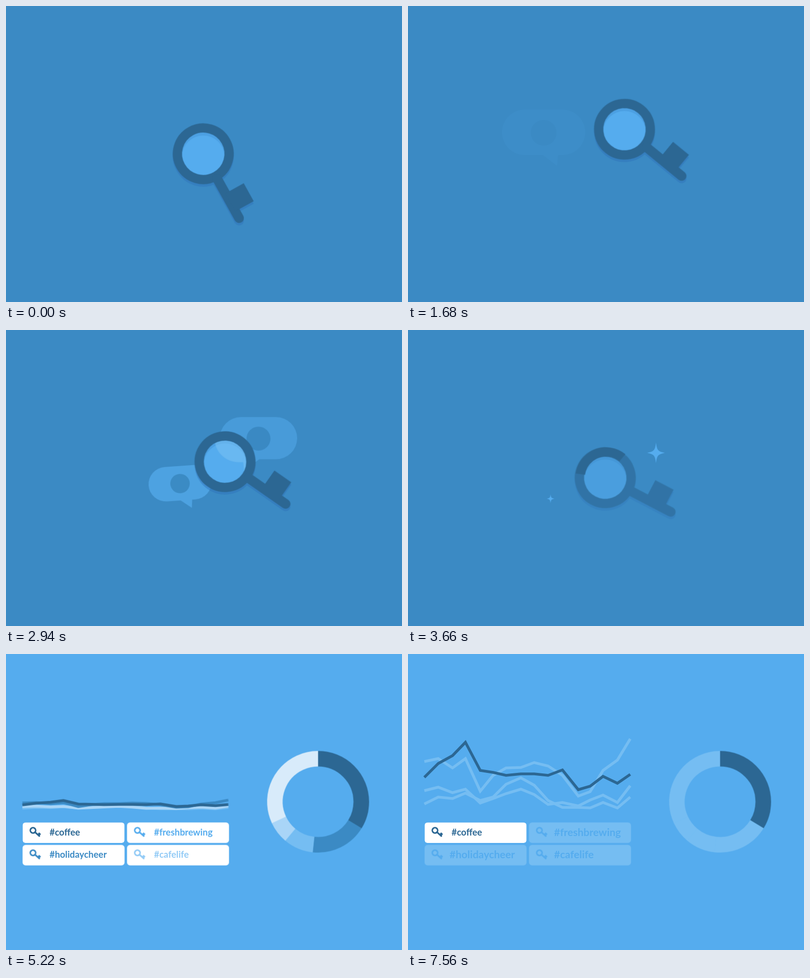
Recreate the animation shown at these times as an HTML page without scripts. Size 800 px wide and 600 px high, loop 8000 ms.

```html
<!DOCTYPE html>
<html lang="en">
<head>
<meta charset="utf-8">
<title>Keyword report</title>
<style>
  @property --x { syntax: "<length>"; inherits: true; initial-value: 398.5px; }
  @property --y { syntax: "<length>"; inherits: true; initial-value: 299.5px; }
  @property --a { syntax: "<angle>"; inherits: true; initial-value: 61deg; }

  html, body { margin: 0; height: 100%; overflow: hidden; background: #3b8ac4; }
  svg { display: block; width: 100vw; height: 100vh; animation: travel 8s infinite; }

  /* Percentages are milliseconds / 80. */
  @keyframes travel {
    0%, 1.875% { --x: 398.5px; --y: 299.5px; --a: 61deg; animation-timing-function: ease-in-out; }
    11.625% { --x: 307px; --y: 261.5px; --a: 56deg; animation-timing-function: ease-in; }
    13.875% { --x: 316px; --y: 264.5px; --a: 46.6deg; animation-timing-function: cubic-bezier(.35, .2, .65, .85); }
    21.75% { --x: 444px; --y: 249px; --a: 39deg; animation-timing-function: ease-out; }
    31.125%, 32.25% { --x: 487px; --y: 234px; --a: 36.5deg; animation-timing-function: ease-in-out; }
    41.25% { --x: 398.5px; --y: 299.5px; --a: 33.5deg; animation-timing-function: ease-out; }
    45.75%, 100% { --x: 398.5px; --y: 299.5px; --a: 27.6deg; }
  }

  .bg { fill: #3b8ac4; animation: brighten 8s linear infinite; }
  @keyframes brighten {
    0%, 46.25% { fill: #3b8ac4; }
    51.875%, 100% { fill: #55acee; }
  }

  /* Key and lens */
  .key { transform: translate(var(--x), var(--y)); animation: key-out 8s linear infinite; }
  .turn { transform: rotate(var(--a)); }
  .still { transform: translate(calc(-1 * var(--x)), calc(-1 * var(--y))); }
  @keyframes key-out {
    0%, 43.5% { opacity: 1; }
    49.5%, 100% { opacity: 0; }
  }

  /* Speech bubbles, growing from the tip of the tail */
  .bubbles { fill: #55acee; color: #3b8ac4; }
  .lit { fill: #7cc3f3; color: #64a9da; }
  .bubble {
    animation: grow 8s infinite backwards, glow 8s linear infinite backwards;
    animation-delay: var(--d, 0s);
  }
  @keyframes grow {
    0%, 24.375% { transform: scale(0); animation-timing-function: ease-out; }
    30%, 100% { transform: scale(1); }
  }
  @keyframes glow {
    0%, 24.375% { opacity: 0; }
    30%, 33.75% { opacity: 1; }
    40%, 100% { opacity: 0; }
  }

  .spark { fill: #55acee; animation: spark 8s linear infinite backwards; animation-delay: var(--d, 0s); }
  @keyframes spark {
    0%, 43.125% { transform: scale(0); }
    45.75% { transform: scale(1); }
    49.125%, 100% { transform: scale(0); }
  }

  /* Donut */
  .slide { animation: slide 8s ease-in-out infinite; }
  @keyframes slide {
    0%, 56.5% { transform: translate(400px, 299.5px); }
    62.5%, 100% { transform: translate(630.5px, 299.5px); }
  }
  .donut {
    fill: none; stroke-width: 31.5;
    animation: donut-on 8s step-end infinite, spin 8s ease-out infinite, widen 8s ease-in-out infinite;
  }
  @keyframes donut-on { 0% { opacity: 0; } 42.375%, 100% { opacity: 1; } }
  @keyframes spin { 0%, 42.375% { rotate: -170deg; } 51.875%, 100% { rotate: 0deg; } }
  @keyframes widen { 0%, 46.5% { scale: .6; } 51.875%, 100% { scale: 1; } }
  .rest { animation: rest-in 8s linear infinite; }
  @keyframes rest-in { 0%, 46.5% { opacity: 0; } 51.25%, 100% { opacity: 1; } }

  /* Report */
  .report { animation: report-on 8s step-end infinite; }
  @keyframes report-on { 0% { opacity: 0; } 56.625%, 100% { opacity: 1; } }
  .wipe { animation: wipe 8s ease-in-out infinite; }
  @keyframes wipe { 0%, 59.375% { transform: scaleX(0); } 64.125%, 100% { transform: scaleX(1); } }
  .lines { fill: none; stroke-width: 5.5; animation: rise 8s ease-in-out infinite; }
  .lines polyline { stroke: var(--c); vector-effect: non-scaling-stroke; }
  @keyframes rise { 0%, 63.375% { transform: scaleY(.01); } 71.25%, 100% { transform: scaleY(1); } }

  .card { color: var(--c); font: 700 18.4px Lato, sans-serif; animation: pop 8s infinite backwards; animation-delay: var(--d, 0s); }
  @keyframes pop {
    0%, 58% { transform: scale(0); animation-timing-function: ease-out; }
    62%, 100% { transform: scale(1); }
  }
  .plate { fill: #fff; }
  .card text, .icon { fill: currentColor; }
  .card .big { font-size: 21px; fill: #55acee; animation: show 8s linear infinite; }
  .off .plate { animation: dim-fill 8s linear infinite; }
  .off .icon { animation: dim-color 8s linear infinite; }
  .off .small { animation: hide 8s linear infinite; }
  .dim { stroke: var(--c); animation: dim-stroke 8s linear infinite; }
  @keyframes dim-fill { 0%, 85% { fill: #fff; } 90.5%, 100% { fill: #75bdf2; } }
  @keyframes dim-color { 0%, 85% { color: var(--c); } 90.5%, 100% { color: #55acee; } }
  @keyframes dim-stroke { 0%, 85% { stroke: var(--c); } 90.5%, 100% { stroke: #75bdf2; } }
  @keyframes hide { 0%, 85% { opacity: 1; } 90.5%, 100% { opacity: 0; } }
  @keyframes show { 0%, 85% { opacity: 0; } 90.5%, 100% { opacity: 1; } }

  .cursor { fill: #172326; animation: point 8s infinite; }
  @keyframes point {
    0%, 73.5% { transform: translate(484px, 602px); animation-timing-function: cubic-bezier(.3, .3, .5, .88); }
    79.5% { transform: translate(212px, 375px); animation-timing-function: ease-out; }
    82.5%, 86.25% { transform: translate(178px, 360px); animation-timing-function: ease-in; }
    94.125%, 100% { transform: translate(484px, 602px); }
  }
</style>
</head>
<body>
<svg viewBox="0 0 800 600">
  <defs>
    <g id="key">
      <circle r="52.2" fill="none" stroke="#2c6793" stroke-width="18.7"/>
      <path d="M58 0H149.3" stroke="#2c6793" stroke-width="19.5" stroke-linecap="round"/>
      <path d="M92-42.5h41.5V0H92z" fill="#2c6793"/>
    </g>
    <g id="key-shadow" fill="none" stroke="#2f6fb8">
      <circle r="52.2" stroke-width="18.7"/>
      <path d="M58 0H149.3" stroke-width="19.5" stroke-linecap="round"/>
      <path d="M92-42.5h41.5V0H92z" fill="#2f6fb8" stroke="none"/>
    </g>
    <g id="bubble">
      <rect x="-84" y="-46" width="168" height="92" rx="46"/>
      <path d="M-4 44L27 68L30 38z"/>
      <circle cy="1" r="26" fill="currentColor"/>
    </g>
    <path id="star" d="M0-21C2-5 4-3 18 0C4 3 2 5 0 21C-2 5-4 3-18 0C-4-3-2-5 0-21z"/>
    <g id="icon" transform="translate(-82 -4.8) rotate(42)">
      <circle r="5.4" fill="none" stroke="currentColor" stroke-width="3.2"/>
      <path d="M6 0H17.3" stroke="currentColor" stroke-width="3.2" stroke-linecap="round"/>
      <path d="M12-5.2h5.2V0H12z"/>
    </g>
    <rect id="plate" x="-103" y="-20.75" width="206" height="41.5" rx="6"/>
    <clipPath id="lens"><circle r="43"/></clipPath>
    <clipPath id="reveal"><rect class="wipe" width="460" height="340"/></clipPath>
  </defs>

  <rect class="bg" width="800" height="600"/>

  <g class="bubbles">
    <g transform="translate(301 324)"><g class="bubble" style="--d:-1.47s"><use href="#bubble" transform="translate(-27 -68)"/></g></g>
    <g transform="translate(485 282.5) scale(-.93 .93)"><g class="bubble"><use href="#bubble" transform="translate(-27 -68)"/></g></g>
    <g transform="translate(372 362) scale(.757)"><g class="bubble" style="--d:.09s"><use href="#bubble" transform="translate(-27 -68) rotate(-4)"/></g></g>
  </g>

  <g class="key">
    <g transform="translate(0 5)" opacity=".4"><g class="turn"><use href="#key-shadow"/></g></g>
    <circle r="44" fill="#4ca0e3"/>
    <g clip-path="url(#lens)">
      <circle cy="6" r="43" fill="#55acee"/>
      <g class="still lit">
        <g transform="translate(301 324)"><g class="bubble" style="--d:-1.47s"><use href="#bubble" transform="translate(-27 -68) scale(1.14)"/></g></g>
        <g transform="translate(485 282.5) scale(-.93 .93)"><g class="bubble"><use href="#bubble" transform="translate(-27 -68) scale(1.14)"/></g></g>
      </g>
    </g>
    <g class="turn"><use href="#key"/></g>
  </g>

  <g transform="translate(501 249)"><use class="spark" href="#star"/></g>
  <g transform="translate(288 342)"><use class="spark" href="#star" style="--d:.12s"/></g>
  <g transform="translate(539 433)"><use class="spark" href="#star" style="--d:.24s"/></g>

  <g class="slide">
    <g class="donut">
      <g class="rest">
        <circle class="dim" style="--c:#3b8ac4" r="87.25" pathLength="360" stroke-dasharray="65.2 360" transform="rotate(31)"/>
        <circle class="dim" style="--c:#75bdf2" r="87.25" pathLength="360" stroke-dasharray="34.2 360" transform="rotate(96)"/>
        <circle class="dim" style="--c:#a9d5f7" r="87.25" pathLength="360" stroke-dasharray="25.2 360" transform="rotate(130)"/>
        <circle class="dim" style="--c:#d8ebfa" r="87.25" pathLength="360" stroke-dasharray="115 360" transform="rotate(155)"/>
      </g>
      <circle stroke="#2c6793" r="87.25" pathLength="360" stroke-dasharray="121.4 360" transform="rotate(-90)"/>
    </g>
  </g>

  <g class="report">
    <g clip-path="url(#reveal)">
      <g transform="translate(0 314)">
        <g class="lines">
          <g transform="translate(0 -314)">
            <polyline class="dim" style="--c:#75bdf2" points="33,304 61,290 90,293 116,282 146,297 172,290 198,264 228,251 255,266 283,297 312,311 344,311 368,312 394,301 423,312 449,290"/>
            <polyline class="dim" style="--c:#a9d5f7" points="33,277 61,270 90,281 116,274 146,302 172,293 198,283 228,274 255,285 283,305 312,301 344,308 368,296 394,286 423,301 449,267"/>
            <polyline class="dim" style="--c:#3b8ac4" points="33,218 61,212 90,231 116,212 146,278 172,246 198,231 228,230 255,220 283,227 312,246 344,288 368,279 394,236 423,215 449,172"/>
            <polyline style="--c:#2c6793" points="33,250 61,222 90,206 116,179 146,236 172,240 198,246 228,243 255,243 283,246 312,235 344,275 368,268 394,248 423,262 449,244"/>
          </g>
        </g>
      </g>
    </g>

    <g transform="translate(136.5 362.25)">
      <g class="card" style="--c:#2c6793">
        <use class="plate" href="#plate"/><use class="icon" href="#icon"/>
        <text x="-48.5" y="5.5">#coffee</text>
      </g>
    </g>
    <g transform="translate(347.5 362.25)">
      <g class="card off" style="--c:#55acee;--d:.06s">
        <use class="plate" href="#plate"/><use class="icon" href="#icon"/>
        <text class="small" x="-48.5" y="5.5">#freshbrewing</text>
        <text class="big" x="-52.5" y="7">#freshbrewing</text>
      </g>
    </g>
    <g transform="translate(136.5 407.75)">
      <g class="card off" style="--c:#3b8ac4;--d:.12s">
        <use class="plate" href="#plate"/><use class="icon" href="#icon"/>
        <text class="small" x="-48.5" y="5">#holidaycheer</text>
        <text class="big" x="-52.5" y="6.5">#holidaycheer</text>
      </g>
    </g>
    <g transform="translate(347.5 407.75)">
      <g class="card off" style="--c:#93cbf6;--d:.18s">
        <use class="plate" href="#plate"/><use class="icon" href="#icon"/>
        <text class="small" x="-48.5" y="5">#cafelife</text>
        <text class="big" x="-52.5" y="6.5">#cafelife</text>
      </g>
    </g>
  </g>

  <path class="cursor" d="M0 0L29 22L19 23.5L26 39L18 42.5L11 27.5L4 37z"/>
</svg>
</body>
</html>
```
